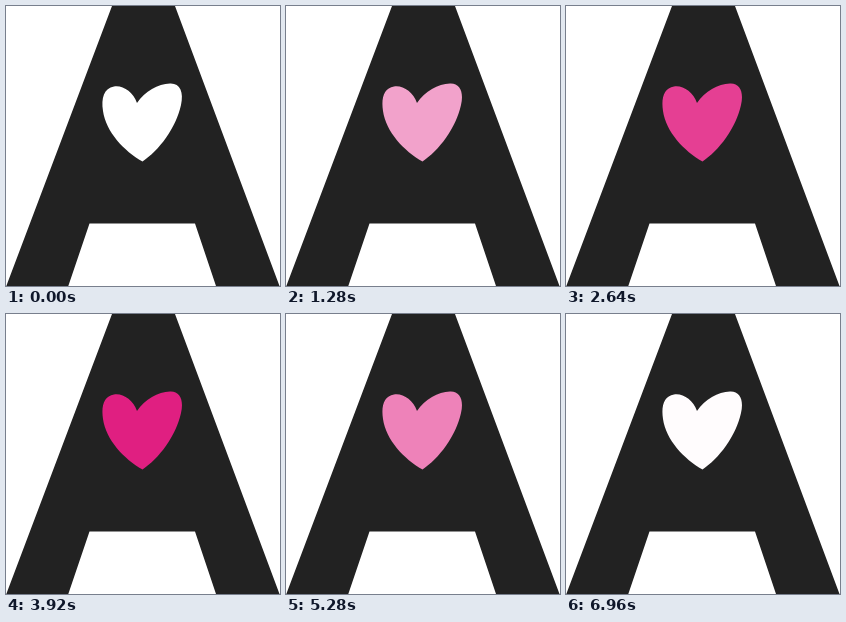
Recreate the animation shown at these times as an HTML page. Size 274 px wide and 280 px high, loop 7000 ms.

```html
<!DOCTYPE html>
<html lang="en">
<head>
<meta charset="utf-8">
<title>Letter A with a heart</title>
<style>
  html, body {
    margin: 0;
    width: 100%;
    height: 100%;
    overflow: hidden;
    background: #fff;
  }
  svg {
    display: block;
    width: 274px;
    height: 280px;
  }
  .letter { fill: #222; }
  .heart {
    fill: #fff;
    animation: blush 7s linear infinite;
  }
  @keyframes blush {
    0%, 100% { fill: #fff; }
    50% { fill: #dc0070; }
  }
</style>
</head>
<body>
<svg viewBox="0 0 274 280" aria-label="A">
  <path class="letter" d="M106 0H169L273.5 280H210L189 217.5H83.5L62.3 280H0.3Z"/>
  <path class="heart" d="M131 97C127 86 117 79 108 80.5C98 82 95 92 97 105C100 126 118 145 136.500 155.500C153 144.500 170 122 175 99C178 86 174 77 164 77.500C152 78 139 85 131 97Z"/>
</svg>
</body>
</html>
```
